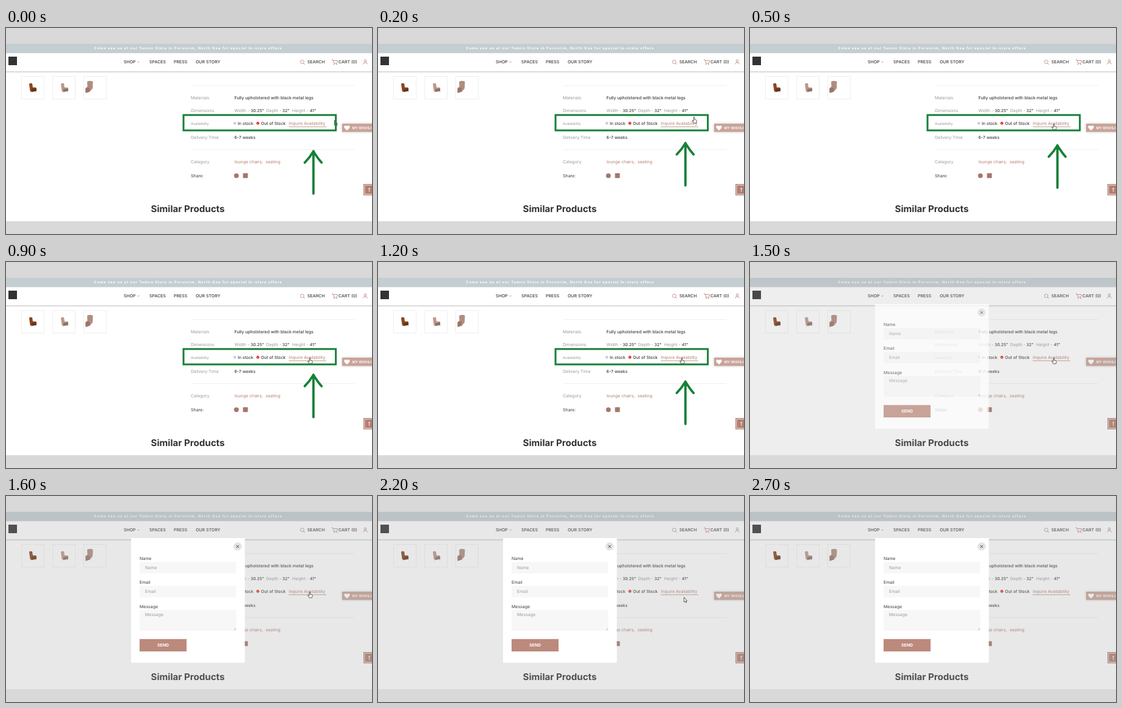
These frames come from a looping animation (600 by 338 pixels, 2.8 s). An HTML page:

```html
<!DOCTYPE html>
<html lang="en">
<head>
<meta charset="utf-8">
<title>Availability enquiry</title>
<style>
html, body { margin: 0; width: 100%; height: 100%; overflow: hidden; background: #fff; }
svg { display: block; width: 600px; height: 338px; }
text { font: 400 7px Inter, "Open Sans", sans-serif; fill: #999; text-rendering: geometricPrecision; }
.dark { fill: #3c3c3c; font-weight: 500; }
.label { fill: #3c3c3c; }
.brown { fill: #b27f70; }
.banner { font-size: 5.8px; font-weight: 700; letter-spacing: .97px; fill: #fff; }
.title { font-size: 15.1px; font-weight: 700; fill: #333; }
.line { fill: none; stroke: #b27f70; stroke-width: .8; }
.rule { stroke: #ececec; stroke-width: .8; }
.mid { text-anchor: middle; }
.green { fill: none; stroke: #178038; stroke-width: 3; }
.raised { filter: drop-shadow(0 0 2px #0003); }
</style>
</head>
<body>
<svg viewBox="0 0 600 338">
  <defs>
    <linearGradient id="shade" x2="0" y2="1">
      <stop stop-color="#ccc"/><stop offset="1" stop-color="#fff"/>
    </linearGradient>
    <g id="chair">
      <path d="M0 2Q0 0 2 0L5 .5 6 7 11 7 12 8.500V13L4 14.500 1.500 13Z"/>
      <path d="M4 9.500L12 8.500V13L4 14.500Z" fill="#000" opacity=".25"/>
      <path d="M2.500 14V16M11.500 13.500V15.500" stroke="#bbb" stroke-width=".6"/>
    </g>
  </defs>

  <g id="page">
    <rect y="26" width="600" height="15.300" fill="#c4cdd1"/>
    <text class="banner mid" x="298.500" y="35.300">Come see us at our Tamvo Store in Porvorim, North Goa for special In-store offers</text>
    <rect y="71" width="600" height="3" fill="url(#shade)"/>
    <rect x="4" y="47" width="14" height="14" fill="#333"/>
    <g id="nav"></g>
    <g class="line">
      <path d="M215.300 55l1.700 1.600 1.700-1.600"/>
      <circle cx="485.600" cy="55.600" r="2.900"/>
      <path d="M487.700 57.700l2.300 2.300M534 52h1.800l1.700 5.800h5l1.200-4.300h-7.200"/>
      <circle cx="538" cy="59.500" r=".6"/><circle cx="542" cy="59.500" r=".6"/>
      <circle cx="589" cy="53.900" r="1.800"/>
      <path d="M585.800 59.500q0-3 3.200-3t3.200 3"/>
    </g>

    <g fill="none" stroke="#efefef">
      <rect x="25.500" y="79.500" width="37" height="37"/>
      <rect x="76.500" y="79.500" width="37" height="37"/>
      <rect x="127.500" y="79.500" width="37" height="37"/>
    </g>
    <use href="#chair" x="38" y="90.500" fill="#8a4720"/>
    <use href="#chair" x="90" y="90.500" fill="#bc998b"/>
    <path d="M133 88Q138 85.500 142.500 88L142 99 137.500 104.500 130.500 106.500V98.500L133.500 96Z" fill="#b08d7f"/>
    <path d="M130.500 99L137 97.500V104.500L130.500 106.500Z" fill="#99756a"/>

    <path class="rule" d="M303 94.500H571M303 199.500H571"/>
    <g id="details"></g>
    <circle cx="375.200" cy="156.300" r="2.300" fill="#c9cadb"/>
    <circle cx="412.900" cy="156.300" r="2.500" fill="#e8483d"/>
    <path class="line" d="M463.500 162H525"/>
    <circle cx="377.700" cy="242.300" r="3.900" fill="#a5776a"/>
    <rect x="388.500" y="238.200" width="8" height="8" rx="1" fill="#a5776a"/>

    <rect class="raised" x="551" y="157" width="52" height="13.500" fill="#c9a398"/>
    <path d="M559 168.300l-4.200-4.200q-1.300-2 .3-3.500 2-1.500 3.900.7 1.900-2.200 3.900-.7 1.600 1.500.3 3.500Z" fill="#fff"/>
    <text x="567.500" y="166" style="font-size:5.800px;font-weight:600;fill:#fff">MY WISHLIST</text>
    <rect x="586" y="256" width="18" height="18.500" fill="#b27f70"/>
    <path d="M602 257.800H587.800V272.700H602M595.500 269v-6.500m-1.600 1.700l1.600-1.700 1.600 1.700" fill="none" stroke="#fff" stroke-width=".8"/>
    <text class="title mid" x="298" y="302.300">Similar Products</text>
  </g>

  <rect id="veil" y="26" width="600" height="291" fill="#a5a5a5"/>
  <path d="M0 0H600V26H0ZM0 317H600V338H0Z" fill="#d9d9d9"/>

  <g id="popup">
    <rect x="205" y="69" width="186.500" height="204.500" fill="#fff"/>
    <circle cx="379.700" cy="82.800" r="6.800" fill="#e4e4e4"/>
    <path d="M377.500 80.600l4.400 4.400m0-4.400l-4.400 4.400" stroke="#333" stroke-width=".9"/>
    <g id="fields"></g>
    <path d="M373.800 220l3-3m-1.300 3l1.300-1.300" stroke="#888" stroke-width=".6"/>
    <rect x="219" y="234.700" width="77" height="20.300" fill="#bc8a7c"/>
    <text class="mid" x="257.500" y="247.300" style="font-weight:700;fill:#fff;font-size:6.900px">SEND</text>
  </g>

  <g fill="#fff" stroke="#333" stroke-width=".8" stroke-linejoin="round">
    <path id="pointer" d="M0 0V8L1.800 6.500 3 9 4.300 8.400 3.100 6H5Z"/>
    <path id="hand" d="M-.8 0Q0-1 .8 0V3.700l2.700.7q1 .4.800 1.600L3.600 9.500H-.8L-3.300 5.500q.5-1.200 2.500.5Z"/>
  </g>

  <g id="marks" class="green">
    <rect x="291" y="142.800" width="249.700" height="25.200"/>
    <path id="arrow" d="M504 2V71.700M489.800 20.800Q498 12.500 504 2.200 510 12.500 517.300 20.800" stroke-linecap="round" stroke-linejoin="round" style="stroke-width:3.800"/>
  </g>
</svg>
<script>
const LOOP = 2800, STEP = 100;
const $ = id => document.getElementById(id);
const label = ([x, y, text, style = "", size = 7]) =>
  `<text x="${x}" y="${y}" class="${style}" style="font-size:${size}px">${text}</text>`;
const write = (id, rows) => $(id).innerHTML = rows.map(label).join("");

write("nav", [
  [193, "SHOP"], [235, "SPACES"], [275, "PRESS"], [311, "OUR STORY"],
  [494, "SEARCH"], [545, "CART (0)"]
].map(([x, text]) => [x, 58, text, "dark"]));

write("details", [
  [303, 117, "Materials"], [374.500, 117, "Fully upholstered with black metal legs", "dark"],
  [303, 137.500, "Dimensions"],
  [374.500, 137.500, "Width -"], [401, 137.500, "30.25\"", "dark", 6.800],
  [426.500, 137.500, "Depth -"], [453, 137.500, "32\"", "dark", 6.800],
  [469, 137.500, "Height -"], [498, 137.500, "41\"", "dark", 6.800],
  [303, 158.500, "Availability", "", 5.900],
  [380, 158.700, "In stock", "dark", 6.800], [418, 158.700, "Out of Stock", "dark", 6.800],
  [463.500, 158.700, "Inquire Availability", "brown"],
  [303, 181.500, "Delivery Time"], [374.500, 181.500, "6-7 weeks", "dark", 6.900],
  [303, 221.500, "Category"],
  [374.500, 221.500, "lounge chairs,", "brown"], [425.500, 221.500, "seating", "brown"],
  [303, 244.500, "Share:", "label"]
]);

$("fields").innerHTML = [
  ["Name", 105, 108, 19], ["Email", 144.200, 147.400, 19], ["Message", 183.500, 187, 34]
].map(([name, base, top, height]) =>
  `<rect x="219" y="${top}" width="158.500" height="${height}" fill="#f7f7f7"/>` +
  label([219, base, name, "label"]) +
  label([228, top + (height > 20 ? 10 : 12), name])
).join("");

const clamp = v => Math.max(0, Math.min(1, v));
const show = (el, on) => el.style.display = on ? "" : "none";
const place = (el, x, y) => el.setAttribute("transform", `translate(${x} ${y})`);

// Steady up-and-down travel, starting at the bottom
function arrowY(t) {
  const phase = t / 322 % 2;
  return 200 - 21.500 * (phase < 1 ? phase : 2 - phase);
}

function cursorAt(t) {
  if (t < 1900) {
    const p = clamp(t / 400);
    return [538.500 - 40.500 * p, 151.500 + 6 * p - 8 * Math.sin(Math.PI * p)];
  }
  const p = clamp((t - 1800) / 400);
  return [498 + 3.700 * p, 157.500 + 8.500 * p];
}

function draw(t) {
  const fade = t < 1400 ? 0 : t < 1500 ? .2 : t < 1600 ? .75 : 1;
  $("veil").setAttribute("opacity", .256 * fade);
  $("popup").setAttribute("opacity", fade);
  show($("marks"), t < 1500);
  place($("arrow"), 0, arrowY(t));

  const [x, y] = cursorAt(t);
  const overLink = x < 525 && y < 162;
  show($("hand"), overLink);
  show($("pointer"), !overLink && t < 2500);
  place($("hand"), x, y);
  place($("pointer"), x, y);
}

function tick() {
  draw(Math.floor(performance.now() % LOOP / STEP) * STEP);
  requestAnimationFrame(tick);
}
tick();
</script>
</body>
</html>
```
